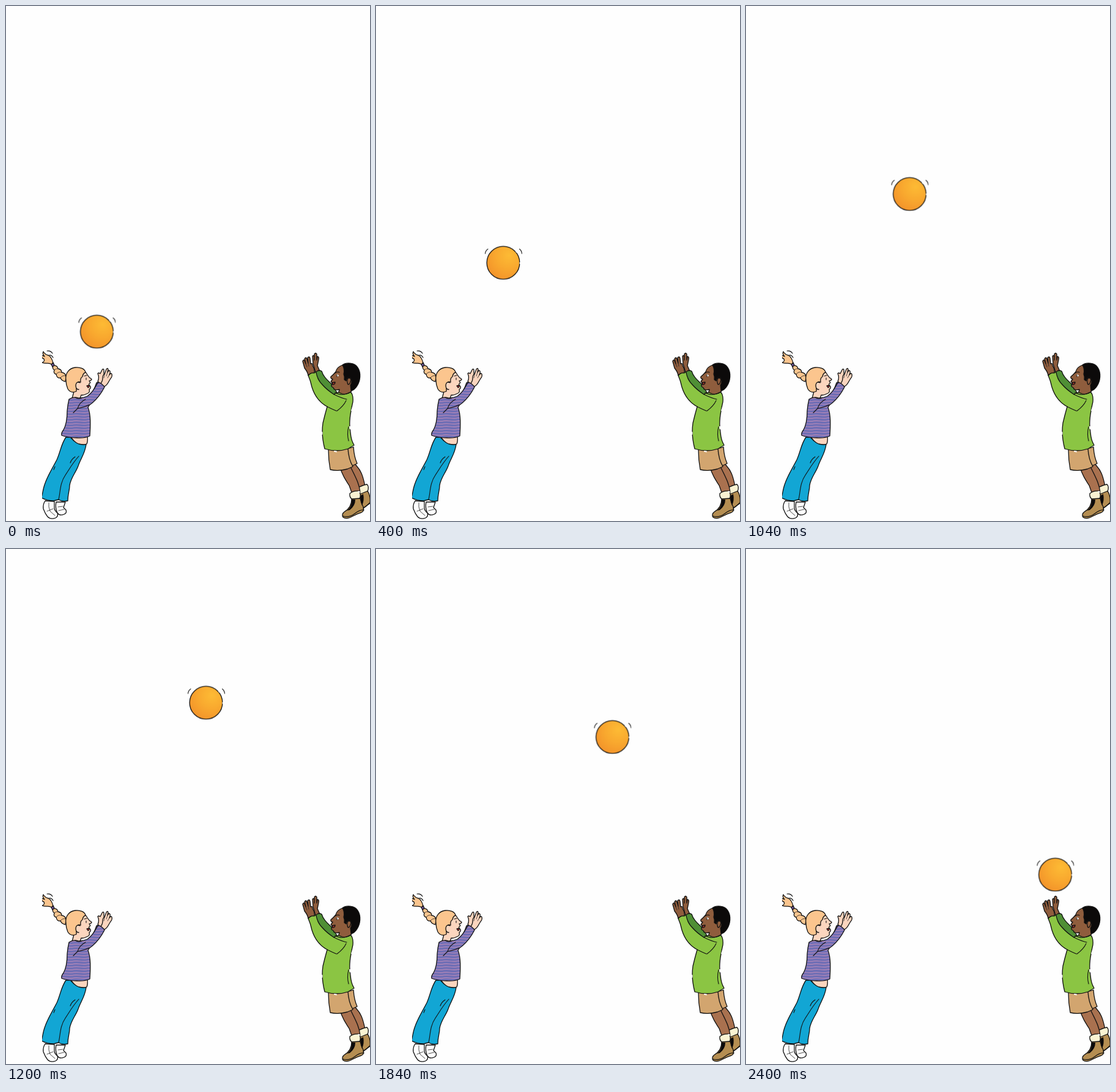
Write an HTML page without scripts that moves like this. It is 595 px wide and 842 px high and loops after 2800 ms.

```html
<!DOCTYPE html>
<html lang="en">
<head>
<meta charset="utf-8">
<title>Playing catch</title>
<style>
  html, body { margin: 0; width: 100%; height: 100%; overflow: hidden; background: #fefefe; }
  svg { display: block; width: 100%; height: 100%; }
  path, circle { stroke-linejoin: round; stroke-linecap: round; }
  .ink { stroke: #111; stroke-width: 1.3; }
  .line { fill: none; stroke: #111; stroke-width: 1.1; }
  .fine { fill: none; stroke: #222; stroke-width: .8; }
  .gap { fill: none; stroke: #fefefe; stroke-width: 2; }
  .hair { fill: #fbc58e; }
  .fair { fill: #fbd5be; }
  .denim { fill: #12a6d4; }
  .white { fill: #fefefe; }
  .brown { fill: #8f5d3d; }
  .leg { fill: #a9714f; }
  .green { fill: #8bc543; }
  .moss { fill: #4f8f35; }
  .tan { fill: #d2a56f; }
  .boot { fill: #b58e52; }
  .cream { fill: #fbf3d2; }
  .black { fill: #0c0a0a; }
  .across { animation: across 2.8s steps(7) infinite; }
  .rise { animation: rise 2.8s step-end infinite; }
  @keyframes across {
    from { transform: translateX(148.5px); }
    to { transform: translateX(565px); }
  }
  @keyframes rise {
    0%, 85.71% { transform: translateY(532.4px); }
    14.28%, 71.42% { transform: translateY(419.8px); }
    28.57%, 57.14% { transform: translateY(307.4px); }
    42.85% { transform: translateY(251.3px); }
  }
</style>
</head>
<body>
<svg viewBox="0 0 595 842" preserveAspectRatio="none">
  <defs>
    <radialGradient id="glow" cx=".68" cy=".28" r=".8">
      <stop offset="0" stop-color="#fdbb35"/>
      <stop offset=".5" stop-color="#f9a92f"/>
      <stop offset="1" stop-color="#f3932a"/>
    </radialGradient>
    <pattern id="knit" width="22" height="4.6" patternUnits="userSpaceOnUse">
      <path fill="#6b6cb4" d="M0 0h22v5H0z"/>
      <path fill="none" stroke="#ac86b8" stroke-width="1.5" d="M-1 2.3Q5 1.5 11 2.3T23 2.3"/>
    </pattern>
    <clipPath id="edge"><path d="M59 540h140v302H59z"/></clipPath>
    <clipPath id="frame"><path d="M-29.800-28h60.300v58h-60.300z"/></clipPath>
  </defs>

  <g id="girl" clip-path="url(#edge)">
    <!-- braid -->
    <path class="line" d="M67 564Q73 563 76 568M70 571Q75 570 77 575"/>
    <path class="ink hair" d="M75 586C69 582 66 586 59 583Q64 581 62 577Q58 576 58 571L63 573Q59 569 61 565Q64 570 69 571Q75 574 77 584Z"/>
    <path class="ink hair" d="M77 588Q84 587 85 593Q91 594 91 599Q98 600 98 607L97 614Q91 613 89 608Q83 609 82 602Q77 601 79 595Q75 593 77 588Z"/>
    <path class="fine" d="M79 595Q83 592 85 593M82 602Q86 597 91 599M89 608Q92 603 98 605"/>
    <path class="ink" fill="#7656a0" d="M74 586L77 583L79 587L76 590Z"/>

    <!-- legs and shoes -->
    <path class="ink white" d="M82 811Q80 820 84 829Q88 834 95 831Q100 829 98 824L94 820L97 811Z"/>
    <path class="ink white" d="M64 809Q60 815 61 822Q64 830 68 835Q73 840 81 837Q86 834 84 829Q79 825 79 820L79 810Z"/>
    <path class="fine" d="M70 812Q69 819 72 826L80 833M67 826L77 822M85 819L93 818M86 825L95 823"/>
    <path class="ink denim" d="M98 705C90 716 89 729 83 742C78 752 69 766 64 780C60 790 60 798 58 804Q67 809 78 809L86 807Q92 811 101 809C101 798 104 792 104 784C106 771 114 763 118 752C122 740 129 732 131 717Q119 717 111 711L105 705Z"/>
    <path class="line" d="M119 736C109 747 103 758 97 767C88 780 89 794 86 807M105 747Q107 741 113 737M78 758L80 753"/>
    <path class="ink fair" d="M106 704Q111 713 119 716Q127 718 132 716Q134 711 133 704Z"/>

    <!-- hands -->
    <path class="ink fair" d="M150 614Q153 607 150 601Q151 599 154 601L157 595Q159 592 160 595L160 601L162 608L156 619Z"/>
    <path class="ink fair" d="M154 618Q158 614 158 608Q158 603 161 602L164 594Q166 591 167 594L166 599L168 596Q171 596 170 600L169 603Q172 599 173 602Q174 606 171 609L168 614Q165 620 161 622Z"/>
    <path class="fine" d="M161 602L160 608M166 599L164 605M169 603L166 608"/>

    <!-- head -->
    <path class="ink fair" d="M126 596Q131 598 133 603Q136 608 140 610Q140 612 136 613L138 616Q135 617 136 620L138 622Q139 625 136 627Q138 632 132 634Q126 637 123 636L121 642H108L114 618Z"/>
    <path class="ink hair" d="M98 612C96 600 104 592 113 591C121 590 129 593 130 599Q126 600 125 606Q121 608 122 615Q116 613 115 619L115 630Q106 634 101 626Q98 619 98 612Z"/>
    <path class="ink fair" d="M121 616Q115 613 114 620Q114 627 119 627"/>
    <path class="line" d="M128 605L132 604M131 608V611"/>
    <path class="ink" fill="#c7252b" d="M132 621L136 620Q136 624 134 624Z"/>

    <!-- sweater -->
    <path class="ink" fill="url(#knit)" d="M134 642Q144 629 148 616Q152 613 160 624L145 642Z"/>
    <path class="ink" fill="url(#knit)" d="M103 643Q110 638 119 641Q126 641 133 638Q142 631 147 621L151 615Q157 617 161 623C155 635 148 643 141 649Q136 652 134 656C139 669 138 687 137 703Q128 707 116 706Q101 706 91 702Q90 698 94 693C99 684 100 672 100 662Q101 651 103 643Z"/>
    <path class="line" d="M117 658Q128 656 136 652M117 658Q120 648 130 643M117 658L110 665M113 640Q119 644 125 640"/>
  </g>

  <g id="boy">
    <!-- far arm -->
    <path class="ink brown" d="M506 599Q504 592 502 585L501 573Q502 570 504 573L504 579V569Q506 566 508 569L508 579L509 573Q512 573 511 578L509 588L513 597Z"/>
    <path class="ink moss" d="M505 600Q510 594 516 597C519 607 526 612 533 619L541 632L535 638Q517 628 507 610Z"/>

    <!-- legs -->
    <path class="ink leg" d="M556 750Q562 766 572 777Q577 785 578 796L589 793C585 779 584 764 574 753L569 747Z"/>
    <path class="ink cream" d="M575 788Q581 784 590 782Q594 786 591 794L580 799Q576 796 575 788Z"/>
    <path class="ink boot" d="M579 798L591 793Q596 800 595 812Q590 817 583 822L575 818Q580 808 579 798Z"/>
    <path class="ink leg" d="M546 754C550 769 556 776 561 784L566 798L579 795C577 779 571 770 562 751Z"/>
    <path class="ink cream" d="M562 797Q568 792 577 793Q581 799 578 806L566 807Q561 803 562 797Z"/>
    <path class="ink boot" d="M565 806L579 805Q580 812 584 819Q586 826 581 828Q574 830 567 834Q557 840 551 836Q548 831 553 827Q565 820 565 806Z"/>
    <path class="black" d="M565 807L571 807Q571 817 562 824L557 825Q566 819 565 807ZM580 800L584 798Q586 808 582 817Q579 809 580 800Z"/>
    <path class="ink" fill="none" d="M551 834Q561 837 570 830T585 824M584 821L595 813"/>

    <!-- shorts -->
    <path class="ink tan" d="M558 724L568 721Q569 737 574 748L563 753Z"/>
    <path class="ink tan" d="M527 725Q527 742 530 758Q543 761 558 757L567 753Q560 741 559 724Z"/>

    <!-- head -->
    <path class="ink brown" d="M550 587Q541 590 539 598Q535 603 531 606Q530 609 534 610L531 614Q534 616 533 618Q530 622 535 624Q536 629 545 627L543 634L560 638L567 625L564 596Z"/>
    <path class="ink black" d="M550 587C556 582 570 583 575 591C581 600 579 613 574 621Q570 628 564 629L563 620Q567 613 563 608Q558 605 556 613L553 611Q554 606 552 602Q554 594 550 587Z"/>
    <path class="ink brown" d="M558 616Q557 608 561 608Q566 609 562 617Q559 621 558 616Z"/>
    <path class="line" d="M538 600Q542 597 545 599"/>
    <path class="white" d="M540 603Q543 601 544 605L541 606Z"/>
    <path class="line" d="M541 603V606"/>
    <path class="ink" fill="#b7322c" d="M533 616L538 615Q538 619 534 619Z"/>

    <!-- jumper -->
    <path class="ink green" d="M494 604Q500 597 507 599Q509 611 517 619Q525 628 536 635Q541 630 547 633Q554 637 563 631Q568 635 567 647C563 665 560 681 563 697Q564 710 569 718Q562 722 559 724Q541 730 521 724C517 709 516 696 518 682Q521 669 525 655C512 648 504 636 500 623Q498 613 494 604Z"/>
    <path class="line" d="M525 655Q535 660 540 662M536 635Q548 641 557 643M541 662Q552 654 556 645M538 632Q549 639 564 631M560 688Q557 700 560 711"/>

    <!-- near hand -->
    <path class="ink brown" d="M494 604Q493 598 488 592L485 581Q486 577 488 580L490 585L488 577Q490 573 492 577L494 584L493 575Q496 572 497 576L498 585Q501 583 501 588Q505 594 504 600Q498 599 494 604Z"/>
    <path class="fine" d="M490 585L492 590M494 584L495 589"/>

    <!-- broken outline -->
    <path class="gap" d="M567 656L565 661M562 688L562.500 691M516.500 697V700M537 728L540 728.500M576 794L578 794.500"/>
  </g>

  <g class="across">
    <g class="rise" clip-path="url(#frame)">
      <circle class="ink" r="26.900" fill="url(#glow)"/>
      <path class="line" d="M-29.500-15Q-29-20-25-22.500M26.500-22.500Q30-20 30.500-15"/>
      <path class="gap" d="M21-18.500L22-17.500M27.500 0V1"/>
    </g>
  </g>
</svg>
</body>
</html>
```
